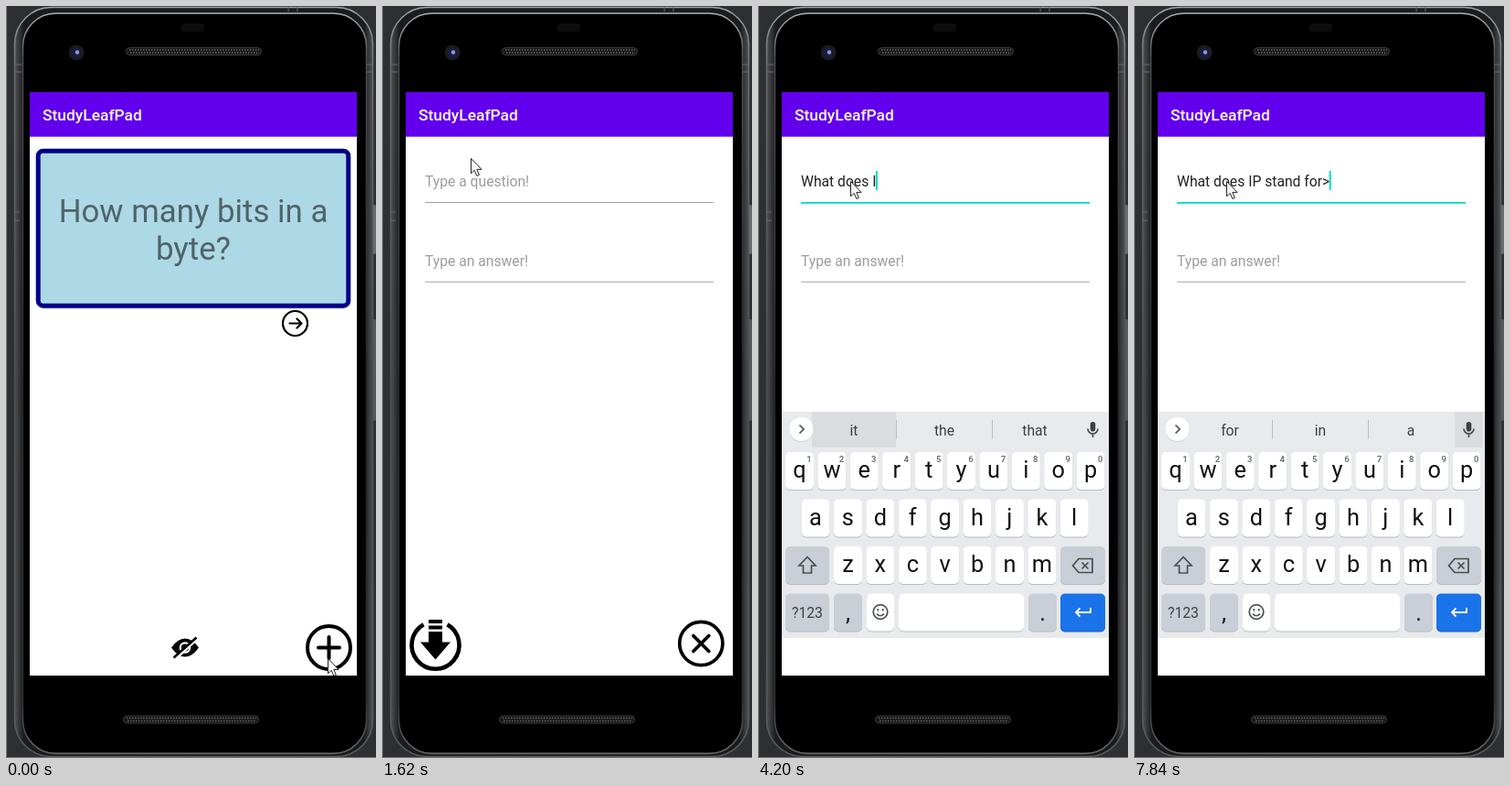
An HTML page for the animation above (8000 ms loop, 405 px wide and 821 px high).

```html
<!DOCTYPE html>
<html lang="en">
<head>
<meta charset="utf-8">
<title>Study cards</title>
<style>
html, body { margin: 0; width: 100%; height: 100%; overflow: hidden; background: #2e2f33; }
svg { display: block; width: 100vw; height: 100vh; font-family: Roboto, sans-serif; }
text { white-space: pre; }
.mid { text-anchor: middle; }
.title { font-size: 17.4px; font-weight: 500; fill: #fff; }
.field { font-size: 15.68px; fill: #212121; }
.hint { fill: #9c9c9c; }
.card { font-size: 34.84px; fill: rgba(0, 0, 0, .54); }
.key { font-size: 25.3px; fill: #111; }
.digit { font-size: 9.5px; font-weight: 500; fill: #5f6368; }
.word { font-size: 15.68px; fill: #3c4043; }
.line { fill: none; stroke: #000; }
.icon { fill: none; stroke: #4a4d51; stroke-width: 1.7; }
.composing { text-decoration: underline; text-decoration-thickness: 1px; }

.page { transform-origin: 205px 412.5px; }
#deck { animation: leave 8s step-end infinite; }
#form { animation: enter 8s step-end infinite; }
#mouse { animation: point 8s step-end infinite; }
@keyframes leave {
  0% { transform: scale(1); visibility: visible; }
  11.25% { transform: scale(1.02); }
  12.75% { transform: scale(1.04); }
  14.25% { transform: scale(1.047); }
  15.75% { transform: scale(1.05); }
  17.25%, 100% { transform: scale(1.05); visibility: hidden; }
}
@keyframes enter {
  0% { transform: scale(.85); opacity: 0; }
  11.25% { transform: scale(.907); opacity: .34; }
  12.75% { transform: scale(.97); opacity: 1; }
  14.25% { transform: scale(.99); opacity: 1; }
  15.75% { transform: scale(.997); opacity: 1; }
  17.25%, 100% { transform: scale(1); opacity: 1; }
}
@keyframes point {
  0% { transform: translate(352px, 712px); }
  9.75% { transform: translate(351px, 711px); }
  11.25% { transform: translate(342px, 701px); }
  12.75% { transform: translate(300px, 636px); }
  14.25% { transform: translate(236px, 516px); }
  15.75% { transform: translate(170px, 378px); }
  17.25% { transform: translate(122px, 250px); }
  18.75% { transform: translate(98px, 152px); }
  20.25% { transform: translate(97px, 166px); }
  21.75% { transform: translate(101px, 186px); }
  23.25%, 100% { transform: translate(101px, 191px); }
}
</style>
</head>
<body>
<svg viewBox="0 0 405 821" preserveAspectRatio="none">
  <defs>
    <clipPath id="screen"><rect x="26" y="94" width="358" height="637"/></clipPath>
    <linearGradient id="band">
      <stop offset="0" stop-color="#505153"/><stop offset=".025" stop-color="#1a1b1c"/>
      <stop offset=".975" stop-color="#1a1b1c"/><stop offset="1" stop-color="#505153"/>
    </linearGradient>
    <linearGradient id="rim" x2="0" y2="1">
      <stop offset="0" stop-color="#a2a3a4"/><stop offset=".08" stop-color="#6a6b6d"/>
      <stop offset=".5" stop-color="#4a4b4d"/><stop offset="1" stop-color="#5c5d5f"/>
    </linearGradient>
    <linearGradient id="bevel" x2="0" y2="1">
      <stop offset="0" stop-color="#b0b1b2"/><stop offset=".06" stop-color="#4d4e50"/>
      <stop offset=".5" stop-color="#242526"/><stop offset=".93" stop-color="#2c2d2e"/>
      <stop offset="1" stop-color="#707173"/>
    </linearGradient>
    <g id="bar">
      <rect x="26" y="94" width="358" height="637" fill="#fff"/>
      <rect x="26" y="94" width="358" height="48.7" fill="#6200ee"/>
      <text class="title" x="40" y="125">StudyLeafPad</text>
    </g>
    <g id="grille">
      <rect x=".5" y=".5" width="148" height="8" rx="4" fill="#171717" stroke="#3b3b3b"/>
      <path d="M4 3H146M5 6H146" stroke="#666" stroke-width="1.6" stroke-dasharray="1.5 1.5"/>
    </g>
  </defs>

  <rect width="405" height="821" fill="#2e2f33"/>
  <path d="M.5 0V820.5H405" fill="none" stroke="#77787a"/>
  <rect x="399" y="217" width="6" height="54" rx="2" fill="#6c6d6f"/>
  <rect x="399" y="342" width="6" height="111" rx="2" fill="#58595b"/>
  <rect x="9.5" y="1.5" width="392" height="818" rx="40" fill="url(#band)" stroke="url(#rim)" stroke-width="1.5"/>
  <rect x="18.5" y="8" width="376" height="808" rx="36" fill="#000" stroke="url(#bevel)" stroke-width="1.5"/>
  <path d="M9 64h8M9 72h8M9 225h6M9 234h6M395 64h7M395 72h7M309 1v5M319 1v5" stroke="#6b6c6e"/>
  <rect x="192" y="19" width="25" height="9" rx="3" fill="#0d0d0d"/>
  <circle cx="77" cy="51" r="8.5" fill="#1b1c20"/>
  <circle cx="77" cy="51" r="5" fill="#171d48"/>
  <circle cx="78" cy="50.5" r="2.2" fill="#8f98d2"/>
  <use href="#grille" x="131" y="45"/>
  <use href="#grille" x="128" y="774.5"/>

  <g clip-path="url(#screen)">
    <g id="deck" class="page">
      <use href="#bar"/>
      <rect x="33" y="157" width="344" height="174" rx="8" fill="#dcdcdc"/>
      <rect x="35.2" y="158.2" width="339.6" height="169" rx="5.5" fill="#add8e6" stroke="#00008b" stroke-width="5"/>
      <text class="card mid" x="205" y="236">How many bits in a</text>
      <text class="card mid" x="205" y="277">byte?</text>
      <g class="line" stroke-width="2.2" stroke-linecap="round" stroke-linejoin="round">
        <circle cx="316.5" cy="346.5" r="13.5"/>
        <path d="M310.5 346.5H323M318.5 341.5L323.5 346.5L318.5 351.5"/>
      </g>
      <path d="M181 700.5Q188 690.5 196 690.5T211 700.5Q204 710.5 196 710.5T181 700.5Z"/>
      <circle cx="196" cy="700.5" r="5.2" fill="none" stroke="#fff" stroke-width="2.2"/>
      <path d="M185 713.5L210 690.5" stroke="#fff" stroke-width="2.6"/>
      <path d="M183.5 711.5L208.5 689.5" stroke="#000" stroke-width="2.6"/>
      <g class="line" stroke-width="4">
        <circle cx="353.5" cy="700.5" r="23.5"/>
        <path d="M342 700.5H365M353.5 689V712" stroke-linecap="round"/>
      </g>
    </g>

    <g id="form" class="page">
      <use href="#bar"/>
      <text id="hint" class="field hint" x="47" y="196.5">Type a question!</text>
      <text id="typed" class="field" x="47" y="196.5"></text>
      <rect id="rule" x="47" y="214" width="316"/>
      <rect id="caret" y="180" width="2" height="21" fill="#03dac5"/>
      <text class="field hint" x="47" y="283.5">Type an answer!</text>
      <rect x="47" y="300.7" width="316" height="1" fill="#a3a3a3"/>
      <path class="line" stroke-width="4.6" d="M45.5 675.2A26 26 0 1 0 71.5 675.2"/>
      <path d="M51 670H66V674H51ZM51 676.5H66V680.5H51ZM51 683H66V694.5H75L58.5 713.5L42 694.5H51Z"/>
      <g class="line" stroke-width="3.7" stroke-linecap="round">
        <circle cx="349.3" cy="696" r="23.6"/>
        <path d="M340.8 687.5L357.8 704.5M357.8 687.5L340.8 704.5"/>
      </g>
    </g>

    <g id="keyboard">
      <rect id="strip" x="26" y="689" width="358" height="42"/>
      <rect x="26" y="443" width="358" height="247" fill="#e8eaed"/>
      <rect id="lit" y="443" height="39" fill="#dadce0"/>
      <circle cx="47.5" cy="463" r="13" fill="#d3d5d8"/>
      <circle cx="47.5" cy="462" r="13" fill="#fff"/>
      <path id="chevron" class="icon"/>
      <g id="tools">
        <g class="icon">
          <circle cx="94" cy="460.5" r="4.7"/><path d="M97.5 464L103 469.5" stroke-width="2"/>
          <path d="M142 456H152Q154 456 154 458V464L149 469H142Q140 469 140 467V458Q140 456 142 456ZM154 463.5H149V469M143.5 463Q146 466 148.5 463.5M144 459.5V461M150 459.5V461"/>
          <path d="M245 457H257V470H245ZM248 461.5H254M248 464H254M248 466.5H252"/>
          <path d="M247.5 457H254.5" stroke-width="4"/>
        </g>
        <text class="mid" x="198.5" y="466.5" font-size="12" font-weight="900" fill="#4a4d51">GIF</text>
        <path d="M282.5 453V472" stroke="#c4c7cb"/>
        <path d="M308.5 462.5H320" stroke="#4a4d51" stroke-width="3.6" stroke-linecap="round" stroke-dasharray="0 5.7"/>
      </g>
      <g id="words"><path d="M151.5 452V473M256.5 452V473" stroke="#bdc1c6"/></g>
      <rect x="363.7" y="454" width="5.6" height="10.5" rx="2.8" fill="#3c4043"/>
      <path class="icon" d="M361 461.5A5.5 5.5 0 0 0 372 461.5M366.5 467V471"/>
      <g id="keys"></g>
      <path id="shift" class="icon" d="M54 601.5L45 611H49.5V619H58.5V611H63Z"/>
      <path class="icon" d="M351 603.5H366V618.5H351L344.5 611ZM354.5 607.5L361.5 614.5M361.5 607.5L354.5 614.5"/>
      <g class="icon">
        <circle cx="134" cy="661.5" r="7.8"/>
        <path d="M130 663.5Q134 668 138 663.5M131.3 658V660.5M136.7 658V660.5"/>
      </g>
      <path d="M364 657V662H348M352.5 657.5L348 662L352.5 666.5" fill="none" stroke="#fff" stroke-width="1.8"/>
    </g>
    <path id="mouse" d="M.5 .5V16.8L4.2 13.4L6.9 19.5L9.4 18.4L6.8 12.4H12Z" fill="#fff" stroke="#222"/>
  </g>
</svg>

<script>
const $ = id => document.getElementById(id);

function add(parent, tag, attrs, text = '') {
  const node = document.createElementNS('http://www.w3.org/2000/svg', tag);
  for (const name in attrs) node.setAttribute(name, attrs[name]);
  node.textContent = text;
  parent.append(node);
  return node;
}

function set(id, attrs) {
  for (const name in attrs) $(id).setAttribute(name, attrs[name]);
}

function key(x, y, width, fill = '#fff', shade = '#b9bcc1') {
  add($('keys'), 'rect', { x, y: y + 1, width, height: 41, rx: 5, fill: shade });
  add($('keys'), 'rect', { x, y, width, height: 41, rx: 5, fill });
}

function label(x, y, text, cls = 'key') {
  return add($('keys'), 'text', { x, y, class: cls + ' mid' }, text);
}

const PITCH = 35.4, GREY = '#caced6';
const letters = [];
['qwertyuiop', 'asdfghjkl', 'zxcvbnm'].forEach((row, r) => {
  const left = [45.5, 63, 98.5][r], top = 487 + r * 51.5;
  [...row].forEach((char, i) => {
    const x = left + i * PITCH;
    key(x - 15.5, top, 31);
    letters.push(label(x, top + 28, char));
    if (!r) label(x + 10.5, top + 10.5, (i + 1) % 10, 'digit');
  });
});
key(30, 590, 48, GREY);
key(331, 590, 49, GREY);
key(30, 641.5, 48, GREY);
key(83, 641.5, 31, GREY);
key(119, 641.5, 30);
key(154, 641.5, 137);
key(296, 641.5, 31, GREY);
key(331, 641.5, 49, '#1a73e8', '#1a62c4');
label(54, 667.5, '?123', 'word');
label(98.5, 671, ',');
label(311.5, 671, '.');

const words = [105, 204, 303].map(x => add($('words'), 'text', { x, y: 469, class: 'word mid' }));

// Time, typed text (| marks the composing word), suggestions
const steps = [
  [0, ''],
  [2870, 'W'],
  [2990, 'Wh'],
  [3140, 'Wha', 'What,Wha,What\'s'],
  [3260, 'What', 'What,Whatever,What\'s'],
  [3500, 'What ', 'is,are,do'],
  [3620, 'What d', 'do,did,is'],
  [3760, 'What do', 'do,does,is'],
  [3910, 'What does', 'does,do,doing'],
  [4200, 'What does I', 'it,the,that'],
  [4320, 'What does IP', 'IP,I,it'],
  [4580, 'What does IP ', 'mean,have,do'],
  [4700, 'What does IP s', 'say,stand,so'],
  [4950, 'What does IP st', 'still,stand,it'],
  [5070, 'What does IP sta', 'stay,stand,start'],
  [5310, 'What does IP stan', 'Stan,stand,start'],
  [5560, 'What does IP |stanf|', 'stanf,stand,standing'],
  [5800, 'What does IP |stanf| ', 'stanf,stand,standing'],
  [5950, 'What does IP stanf ', 'for,and,in'],
  [6200, 'What does IP stanf', 'stanf,stand,standing'],
  [6320, 'What does IP stan', 'Stan,stand,standing'],
  [6440, 'What does IP stand', 'stand,stands,standing'],
  [6560, 'What does IP stand f', 'for,of,from'],
  [6680, 'What does IP stand fo', 'for,food,follow'],
  [6800, 'What does IP stand for', 'for,food,form'],
  [7060, 'What does IP stand |for|', 'for,four,forth'],
  [7560, 'What does IP stand |for|>', 'for,four,forth'],
  [7840, 'What does IP stand for>', 'for,in,a']
];

function showText(marked) {
  const typed = $('typed');
  typed.textContent = '';
  marked.split('|').forEach((part, i) => {
    if (part) add(typed, 'tspan', i % 2 ? { class: 'composing' } : {}, part);
  });
  $('hint').style.display = marked ? 'none' : '';
  set('caret', { x: 46.5 + (marked ? typed.getComputedTextLength() : 0) });
}

function showSuggestions(list) {
  $('tools').style.display = list ? 'none' : '';
  $('words').style.display = list ? '' : 'none';
  set('chevron', { d: list ? 'M45.5 457.5L50 462L45.5 466.5' : 'M49.5 457.5L45 462L49.5 466.5' });
  if (list) list.split(',').forEach((word, i) => words[i].textContent = word);
}

function showCase(upper) {
  for (const node of letters) {
    node.textContent = upper ? node.textContent.toUpperCase() : node.textContent.toLowerCase();
  }
  $('shift').style.fill = upper ? '#4a4d51' : 'none';
}

let shown;
function render(time) {
  const step = steps.findLast(s => s[0] <= time);
  if (step !== shown) {
    shown = step;
    showText(step[1]);
    showSuggestions(step[2]);
    showCase(!step[1]);
  }
  const focused = time >= 1860;
  set('rule', focused ? { height: 1.8, fill: '#03dac5' } : { height: 1, fill: '#a3a3a3' });
  $('caret').style.display = focused ? '' : 'none';
  $('keyboard').style.display = time >= 2480 ? '' : 'none';
  set('strip', { fill: time < 2620 ? '#e8eaed' : '#fff' });
  const mic = time >= 6800;
  set('lit', { x: mic ? 351 : 59, width: mic ? 31 : step[2] ? 92 : 0 });
}

let start;
function tick(now) {
  start ??= now;
  render((now - start) % 8000);
  requestAnimationFrame(tick);
}
render(0);
requestAnimationFrame(tick);
</script>
</body>
</html>
```
